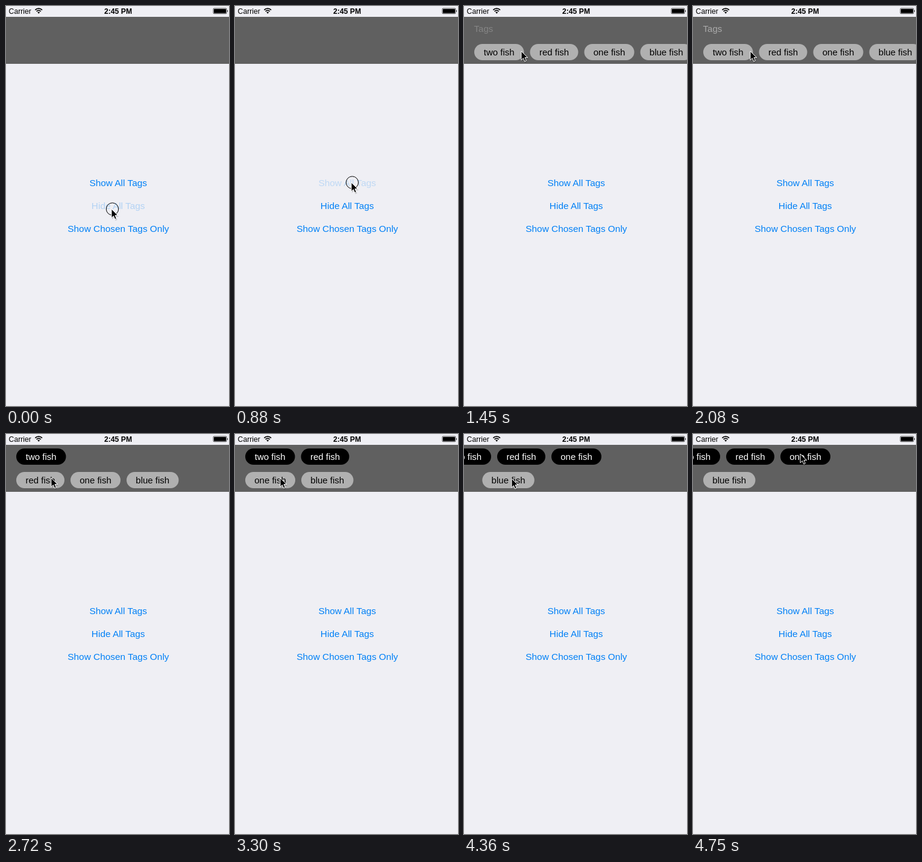
Write an HTML page that moves like this. It is 370 px wide and 664 px high and loops after 4810 ms.

```html
<!DOCTYPE html>
<html lang="en">
<head>
<meta charset="utf-8">
<title>Tag picker</title>
<style>
  html, body { margin: 0; height: 100%; overflow: hidden; background: #efeff4; }
  svg { display: block; width: 370px; height: 664px; font: 15px "Liberation Sans", Arial, sans-serif; }
  .status { font-size: 12.2px; }
  .button { font-size: 15.4px; fill: #0080f6; text-anchor: middle; }
  .pill text { text-anchor: middle; }
  .free rect { fill: #b0b0b0; }
  .chosen text { fill: #fff; }
</style>
</head>
<body>
<svg id="stage" viewBox="0 0 370 664">
  <rect width="370" height="664" fill="#efeff4"/>
  <rect y="18" width="370" height="78" fill="#606060"/>

  <g class="status">
    <text x="4.6" y="12.6">Carrier</text>
    <text x="186" y="12.6" text-anchor="middle" font-weight="bold">2:45 PM</text>
    <g fill="none" stroke="#000" stroke-width="1.7">
      <path d="M48.4 6.7a8 8 0 0 1 11.6 0M50.6 9a5 5 0 0 1 7.2 0"/>
      <path d="M54.2 12.8l-2-2.2a3 3 0 0 1 4 0z" fill="#000" stroke="none"/>
    </g>
    <rect x="344" y="3.9" width="22" height="8.8" rx="1.2" fill="none" stroke="#000" stroke-width=".7"/>
    <rect x="345" y="4.9" width="20" height="6.8" rx=".5"/>
    <path d="M367 6.7a1.8 1.8 0 0 1 0 3.2z"/>
  </g>

  <text class="button" id="show" x="186.2" y="299.3">Show All Tags</text>
  <text class="button" id="hide" x="186.2" y="337.3">Hide All Tags</text>
  <text class="button" x="186.4" y="375.3">Show Chosen Tags Only</text>

  <text id="label" x="16.6" y="43" fill="#aaa">Tags</text>
  <g id="pills"></g>

  <g id="cursor">
    <circle id="ring" cx="1.5" cy="0" r="10.2" fill="none" stroke="#000"/>
    <path d="M1 2v15l3.4-3 2.3 5.2 3-1.3-2.3-5h4.8z" opacity=".16"/>
    <path d="M0 0v14.8l3.4-3.2 2.4 5.4 2.5-1.1-2.3-5.3h4.6z" stroke="#fff"/>
  </g>
</svg>
<script>
const LOOP = 4810, LEFT = 17, GAP = 10, ROW1 = 24, ROW2 = 63;
const NEVER = 2 * LOOP;
const SVG = "http://www.w3.org/2000/svg";
const $ = id => document.getElementById(id);

const clamp = v => Math.min(1, Math.max(0, v));
const ramp = (t, start, end) => clamp((t - start) / (end - start));
const ease = (t, start, end) => {
  const p = ramp(t, start, end);
  return p * p * (3 - 2 * p);
};

// time, x, y of the pointer tip
const path = [
  [0, 175, 337], [480, 175, 337], [700, 193, 293], [1180, 193, 293],
  [1390, 114, 127], [1450, 95, 75], [2610, 95, 75], [2720, 75, 73],
  [3410, 75, 73], [3530, 79, 74], [4430, 79, 74], [4530, 121, 64],
  [4640, 160, 43], [4750, 178, 33], [LOOP, 178, 33]
];

// when the touch ring is visible
const touches = [[0, 115], [880, 1055], [2090, 2190], [2900, 3000], [4010, 4110]];

const tags = [
  { name: "two fish", width: 82.5, tap: 2090 },
  { name: "red fish", width: 80, tap: 2900 },
  { name: "one fish", width: 83, tap: 4010 },
  { name: "blue fish", width: 86.5, tap: NEVER }
];

function add(parent, type, attrs) {
  const el = document.createElementNS(SVG, type);
  for (const key in attrs) el.setAttribute(key, attrs[key]);
  return parent.appendChild(el);
}

function makePill({ name, width }, kind) {
  const g = add($("pills"), "g", { class: "pill " + kind });
  add(g, "rect", { width, height: 27, rx: 13.5 });
  add(g, "text", { x: width / 2, y: 19 }).textContent = name;
  return g;
}

function place(el, x, y, opacity) {
  el.setAttribute("transform", `translate(${x} ${y})`);
  el.setAttribute("opacity", opacity);
}

let nextX = LEFT;
for (const tag of tags) {
  tag.x = nextX;
  nextX += tag.width + GAP;
  tag.free = makePill(tag, "free");
  tag.chosen = makePill(tag, "chosen");
}

// a tapped pill rises to the upper row, then the gap it left closes
const lift = (t, tag) => ease(t, tag.tap + 93, tag.tap + 333);
const close = (t, tag) => ease(t, tag.tap + 190, tag.tap + 400);

function pointer(t) {
  const i = path.findIndex(key => key[0] > t);
  const [t0, x0, y0] = path[i - 1], [t1, x1, y1] = path[i];
  const p = ramp(t, t0, t1);
  return [x0 + (x1 - x0) * p, y0 + (y1 - y0) * p];
}

function draw(t) {
  $("hide").setAttribute("opacity", 0.25 + 0.75 * ramp(t, 40, 290));
  $("show").setAttribute("opacity", t < 880 ? 1 : 0.2 + 0.8 * ramp(t, 1000, 1240));
  $("label").setAttribute("opacity", ease(t, 1250, 1650) * (1 - lift(t, tags[0])));

  const shown = ease(t, 1040, 1400);
  const scroll = 54.5 * lift(t, tags[2]);
  let shift = 0;
  for (const tag of tags) {
    const up = lift(t, tag);
    place(tag.free, tag.x - shift, ROW2 - (ROW2 - ROW1) * up, shown * (1 - up));
    place(tag.chosen, tag.x - scroll, ROW1, up);
    shift += (tag.width + GAP) * close(t, tag);
  }

  const [x, y] = pointer(t);
  place($("cursor"), x, y, 1);
  const touching = touches.some(([from, to]) => t >= from && t < to);
  $("ring").setAttribute("opacity", touching ? 1 : 0);
}

let origin;
function tick(now) {
  origin ??= now;
  draw(Math.max(0, now - origin) % LOOP);
  requestAnimationFrame(tick);
}
draw(0);
requestAnimationFrame(tick);
</script>
</body>
</html>
```
